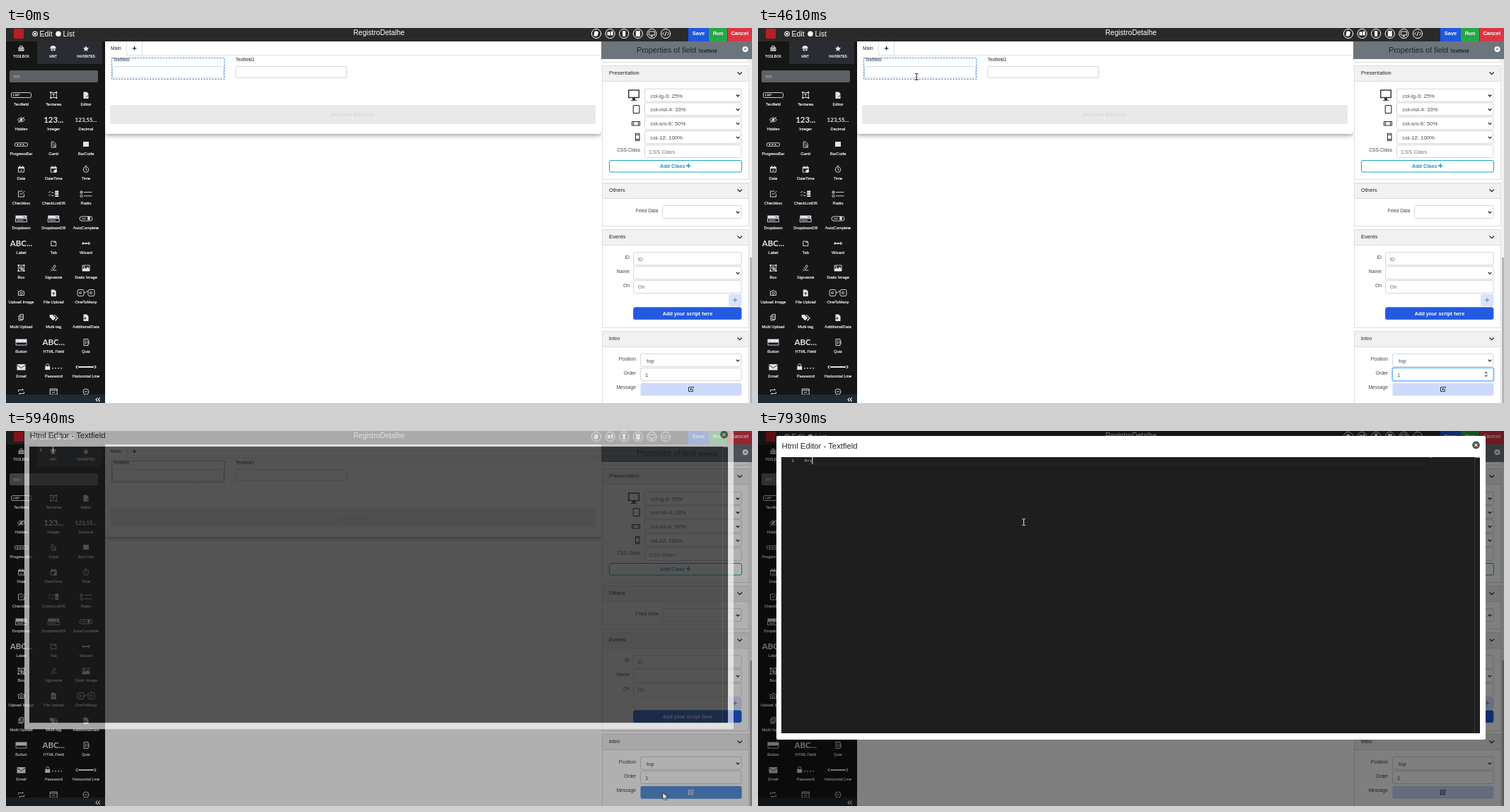
An HTML page that plays this animation: 1054x531 px, repeating every 8 s.

```html
<!DOCTYPE html>
<html lang="en">
<head>
<meta charset="utf-8">
<title>Form builder</title>
<style>
html, body { margin: 0; width: 100%; height: 100%; overflow: hidden; background: #fff; }
svg { display: block; width: 100%; height: 100%; font-family: "Liberation Sans", Arial, sans-serif; }
</style>
</head>
<body>
<svg id="stage" viewBox="0 0 1054 531"></svg>
<script>
const INK = '#212529', SIDE = '#161616', PALE = '#dfe5ee', LINE = '#d0d5da';

// Drawing helpers; text is placed by its vertical centre.
const rect = (x, y, w, h, fill, more = '') =>
  `<rect x="${x}" y="${y}" width="${w}" height="${h}" fill="${fill}" ${more}/>`;
const text = (x, y, s, size, fill = INK, more = '') =>
  `<text x="${x}" y="${y + size * .36}" font-size="${size}" fill="${fill}" ${more}>${s}</text>`;
const line = (d, color, width = 1, more = '') =>
  `<path d="${d}" fill="none" stroke="${color}" stroke-width="${width}" ${more}/>`;
const solid = (d, color) => `<path d="${d}" fill="${color}"/>`;
const dot = (x, y, r) => `M${x - r} ${y}a${r} ${r} 0 1 0 ${2 * r} 0a${r} ${r} 0 1 0 ${-2 * r} 0`;
const group = (x, y, body, more = '') => `<g transform="translate(${x} ${y})" ${more}>${body}</g>`;
const END = 'text-anchor="end"', MID = 'text-anchor="middle"', BOLD = 'font-weight="bold"';

// Icon parts: "#" filled, "!" dark line, "=" lettering, otherwise a line.
const icon = (x, y, parts, color = PALE) => group(x, y, parts.split('|').map(p => {
  const rest = p.slice(1);
  if (p[0] === '#') return solid(rest, color);
  if (p[0] === '!') return line(rest, SIDE, .9);
  if (p[0] === '=') {
    return text(0, 0, rest, rest.length > 6 ? 8 : 11.5, color, `${MID} ${BOLD} font-family="Lato, sans-serif"`);
  }
  return line(p, color, .9);
}).join(''));

const calendar = 'M-4-3h8v7h-8zM-2-5v2M2-5v2|#M-4-3h8v2h-8z|';
const dropdown = '#M-8-4.5h16v4h-16z|M-8 0h16v4.5h-16zM-6 2.3h9|!M3-3.2l1.5 1.5 1.5-1.5';
const file = '#M-3.5-4.5h4.5l2.5 2.5v7h-7z|';
const tools = [
  ['Textfield', 'M-12-3.5h24q2 0 2 2v3q0 2-2 2h-24q-2 0-2-2v-3q0-2 2-2M-11-1.5v3M-9-1h7M-9 .7h5'],
  ['Textarea', 'M-4-3.5h8v7h-8zM-2-1.5h4M0-1.5v4|#M-5-5h2v2h-2zM3-5h2v2h-2zM-5 3h2v2h-2zM3 3h2v2h-2z'],
  ['Editor', file + '!M0 3.5l4-4'],
  ['Hidden', 'M-5 0q5-6 10 0q-5 6-10 0M-4.5 4l9-8|#' + dot(0, 0, 1.8)],
  ['Integer', '=123...'],
  ['Decimal', '=123,55...'],
  ['ProgressBar', 'M-8-2.3h16q1 0 1 1v2.6q0 1-1 1h-16q-1 0-1-1v-2.6q0-1 1-1|#' + dot(-5, 0, 1.1) + dot(-1, 0, 1.1) + dot(3, 0, 1.1)],
  ['Gantt', 'M-3-4h3l3 3v5h-6zM-2-1h2M-1 1h3M0 3h3'],
  ['BarCode', '#M-4-4h8v7h-8z'],
  ['Date', calendar + 'M-1.5 1.3l1.2 1.2 2-2.3'],
  ['DateTime', calendar + '#' + dot(2.5, 2.5, 2.3)],
  ['Time', dot(0, .5, 3.8) + 'M0-1.5v2l1.8 1M-1.5-4.8h3'],
  ['Checkbox', 'M4 0v4h-8v-8h6M-2-1l2 2 5-5'],
  ['CheckListDB', 'M-7-3l1 1 2-2M-7 1.5l1 1 2-2M-3-2h3M-3 2.5h3|#M2-4.5h5v2.4h-5zM2-1.4h5v2.4h-5zM2 1.7h5v2.4h-5z'],
  ['Radio', 'M-3-2.5h11.5M-3 2.8h11.5|' + dot(-6.5, -2.5, 1.7) + dot(-6.5, 2.8, 1.7) + '|#' + dot(-6.5, -2.5, .8)],
  ['Dropdown', dropdown],
  ['DropdownDB', dropdown],
  ['AutoComplete', 'M-6-3h12q3 0 3 3t-3 3h-12q-3 0-3-3t3-3M-6 0h6|#' + dot(4, 0, 2) + 'M2-3h4v1h-4z'],
  ['Label', '=ABC...'],
  ['Tab', 'M-3.5 3.5v-6.5h3l1 1.5h3v5zM0-3h3v1.5'],
  ['Wizard', 'M-5 0h10|#' + dot(-4, 0, 1.6) + dot(0, 0, 1.3) + '|' + dot(4, 0, 1.4)],
  ['Box', 'M-4-4h8v8h-8zM-2-2h3v3h-3zM0 0h2.5v2.5h-2.5z|#M-5-5h2v2h-2zM3-5h2v2h-2zM-5 3h2v2h-2zM3 3h2v2h-2z'],
  ['Signature', 'M-4 3h3l4-6-1.5-1.5-4 5.5M0 3h4'],
  ['Static Image', 'M-5-4h10v8h-10z|#M-5 4v-2l3-3 2 2 2-3 3 3v3z' + dot(-2.5, -2, 1)],
  ['Upload Image', 'M-4-2h2l1-1.5h2l1 1.5h2v5.5h-8z' + dot(0, .7, 1.6)],
  ['File Upload', file + '!M0 3.5v-4M-1.7 1l1.7-1.7 1.7 1.7'],
  ['OneToMany', 'M-10-4.5h5q2 0 2 2v5q0 2-2 2h-5q-2 0-2-2v-5q0-2 2-2M-10-1h4M-10 1h4M-3 0h2l2-2h2M5-4.5h5q2 0 2 2v5q0 2-2 2h-5q-2 0-2-2v-5q0-2 2-2M5-1h4M5 1h4'],
  ['Multi Upload', 'M-1.5-4.5h4.5v7h-4.5zM-1.5-2.5h-2v6.5h5v-1.5M0-2h2M0 0h2'],
  ['Multi-tag', '#M-5.5-4h4l4.5 4.5-3.7 3.7-4.8-4.8zM0-4l5 4.5-3.5 3.7 2 .3 3-4-5-4.5z'],
  ['AdditionalData', file + '!M-4 1h4M-1.5-.7l1.7 1.7-1.7 1.7'],
  ['Button', '#M-8-4.5h16v5h-16z|M-7.5 1v3h15v-3'],
  ['HTML Field', '=ABC...'],
  ['Quiz', 'M-3-4.5h6v9h-6zM-1.5-2h2M-1.5 0h3M-1.5 2h2M3-2h1v5'],
  ['Email', '#M-6-4h12v8.5h-12z|!M-6-3l6 4.5 6-4.5'],
  ['Password', '#M-12-1h7v5h-7zM-2 1h1.6v1.6h-1.6zM2 1h1.6v1.6h-1.6zM6 1h1.6v1.6h-1.6zM10 1h1.6v1.6h-1.6z|M-10.5-1v-1.5a2 2 0 0 1 4 0v1.5'],
  ['Horizontal Line', '#M-13-1h26v2h-26z' + dot(-12.5, 0, 2) + dot(12.5, 0, 2)],
  ['', 'M-4 0v-2.5h7l-1.5-1.5M4 0v2.5h-7l1.5 1.5'],
  ['', 'M-5-4h10v8h-10zM-5-2h10M-2 1h4'],
  ['', dot(0, 0, 4) + 'M-2 0h4'],
];

function topBar() {
  const marks = [
    '#M-2.5-3.5h4l1.5 1.5-1.5 5.5h-5z', '#M-4-2.5h4v5h-4zM1-3.5h3v6h-3z', '#M-2-4h4v8h-4z',
    '#M-3-4h6v8h-6z', 'M-4-3h8v5h-8zM0 2v2M-2 4h4', 'M-2-2.5l-2.5 2.5 2.5 2.5M2-2.5l2.5 2.5-2.5 2.5M1-3l-2 6',
  ];
  const button = (x, w, label, color) => rect(x, 0, w, 19, color) + text(x + w / 2, 7.5, label, 7.5, '#fff', `${MID} ${BOLD}`);
  return rect(0, 0, 1054, 19, '#2a2a2b') + rect(11, 1, 14, 14, '#b91d25')
    + solid(dot(41, 8.3, 3.8) + dot(74, 8.3, 3.8), '#fff') + line(dot(41, 8.3, 2.2), '#333', 1.1)
    + text(47.5, 8.3, 'Edit', 10.5, '#fff') + text(80.5, 8.3, 'List', 10.5, '#fff')
    + text(527, 6.8, 'RegistroDetalhe', 10.1, '#fff', MID)
    + marks.map((m, i) => icon(834 + 19.6 * i, 8, m, '#fff') + line(dot(834 + 19.6 * i, 8, 6.6), '#fff', 1)).join('')
    + button(964, 29, 'Save', '#2258df') + button(993, 26, 'Run', '#28a745') + button(1019.5, 34.5, 'Cancel', '#dc3545');
}

function sidebar() {
  const tab = (x, label, mark) => icon(x, 29, mark) + text(x, 40, label, 4.6, '#fff', `${MID} ${BOLD}`);
  return rect(0, 19, 140, 512, SIDE) + rect(44, 19, 92, 32, '#292c30')
    + tab(21.5, 'TOOLBOX', '#M-4-1.5h8v5h-8z|M-1.7-1.5v-2h3.4v2|!M-4 1h8')
    + tab(66.5, 'HINT', '#M-4-.5q0-3.5 4-3.5t4 3.5v1h-8zM-3 1.3h2.5v2h-2.5zM.5 1.3h2.5v2h-2.5z')
    + tab(113, 'FAVORITES', '#M0-4l1.2 2.7 3 .3-2.2 2 .6 3-2.6-1.5-2.6 1.5.6-3-2.2-2 3-.3z')
    + rect(5, 60, 125, 17, '#5d6064', 'rx="2"') + text(10.5, 68.3, 'em', 6.8, '#b0b4b9')
    + tools.map(([label, parts], i) => {
      const x = 21.5 + 45.75 * (i % 3), y = 95 + 35 * Math.floor(i / 3);
      return icon(x, y, parts) + text(x, y + 13.3, label, 5.75, '#fff', `${MID} stroke="#fff" stroke-width=".15"`);
    }).join('')
    + rect(0, 519, 140, 12, '#202a32') + line('M129.5 523.5l-2.5 2.7 2.5 2.7M132.8 523.5l-2.5 2.7 2.5 2.7', '#fff', 1.1);
}

const field = (x, y, w, h = 18) => rect(x, y, w, h, '#fff', `stroke="${LINE}" rx="2"`);

function canvasArea() {
  return rect(140, 19, 701, 131, '#fff', 'rx="4" style="filter:drop-shadow(0 2px 3px #0006)"')
    + rect(140, 19, 701, 20, '#fff') + line('M170.5 19v19M192.5 19v19M170.5 38.5h670', '#dee2e6')
    + text(148, 29, 'Main', 6.8) + line('M178.7 28.8h5.6M181.5 26v5.6', INK, 1.2)
    + field(150.5, 54.5, 157, 16) + text(151, 44.5, 'Textfield', 6.3)
    + field(324.5, 54.5, 157, 16) + text(324.5, 44.5, 'Textfield1', 6.3)
    + rect(149.5, 42.5, 159, 30, 'none', 'stroke="#4d8fd6" stroke-dasharray="2.5 1.5"')
    + rect(147, 109, 686, 27, '#e9e9e9') + text(490, 122.5, 'Drop new field here!', 6.9, '#cfd1d3', MID);
}

function properties() {
  const card = (y, h, title) => rect(842.5, y + .5, 207, h, '#fff', 'stroke="#dcdcdc"')
    + rect(843, y + 1, 206, 21.5, '#f1f1f1') + line(`M843 ${y + 22.5}h206`, '#dcdcdc')
    + text(852, y + 10.5, title, 7.6) + line(`M1033.5 ${y + 9.5}l3.2 3.2 3.2-3.2`, INK, 1.2);
  const label = (x, y, s) => text(x, y, s, 6.8, '#444', END);
  const input = (x, y, s) => field(x, y, 1039 - x) + text(x + 6, y + 9.3, s, 7.6, '#6c757d');
  const select = (x, y, s = '') => field(x, y, 1039 - x) + text(x + 8, y + 9.5, s, 7.8, '#495057')
    + line(`M1031.7 ${y + 8.3}l2.3 2.3 2.3-2.3`, '#222', 1.3);
  return rect(841, 19, 213, 512, '#fff') + line('M842.5 44v4.5h207V44', '#dcdcdc')
    + rect(841, 19, 213, 25, '#6c757d')
    + text(891, 31.3, 'Properties of field', 10.8) + text(978, 32.5, 'Textfield', 6.6, INK, BOLD)
    + solid(dot(1044.5, 30, 4), '#fff') + line('M1043 28.5l3 3M1046 28.5l-3 3', '#555', 1)
    + card(53, 161, 'Presentation')
    + ['col-lg-3: 25%', 'col-md-4: 33%', 'col-sm-6: 50%', 'col-12: 100%'].map((s, i) => select(902.5, 86.2 + 19.8 * i, s)).join('')
    + line('M879.7 88h14.6v10.5h-14.6z', '#343a40', 1.5) + solid('M885 99h4v3h2v1h-8v-1h2z', '#343a40')
    + rect(886.3, 109.7, 8.6, 11, 'none', 'stroke="#343a40" stroke-width="1.2" rx="1"')
    + line('M884.5 132.5h11v5.5h-11zM886.7 132.5v5.5M893.3 132.5v5.5', '#343a40', 1.1)
    + line('M889.5 149.5h5.5v10h-5.5zM889.5 151.3h5.5M889.5 157.6h5.5', '#343a40', 1.1)
    + label(896, 172.5, 'CSS Class') + input(902.5, 165.5, 'CSS Class')
    + rect(852.5, 187.5, 187, 16.5, '#fff', 'stroke="#17a2b8" rx="2.5"')
    + text(924, 195, 'Add Class', 7.2, '#1797b0', BOLD) + line('M961 195h6.4M964.2 191.8v6.4', '#1797b0', 1.3)
    + card(219, 61, 'Others') + label(921.5, 259, 'Feed Data') + select(927.5, 251.5)
    + card(285, 139, 'Events')
    + label(881, 325, 'ID') + input(886.5, 317.8, 'ID')
    + label(881, 345, 'Name') + select(886.5, 337.6)
    + label(881, 365, 'On') + input(886.5, 357.4, 'On')
    + rect(1021, 377, 18.5, 17, '#d9e2fa', 'rx="2"') + line('M1027 385.3h6M1030 382.3v6', '#6b7a99', 1)
    + rect(886.5, 395.7, 152.5, 17, '#2459e0', 'stroke="#1f86c9" rx="2.5"')
    + text(963, 404, 'Add your script here', 7.2, '#fff', `${MID} ${BOLD}`)
    + card(429, 110, 'Intro')
    + label(890, 468.7, 'Position') + select(896.5, 461.3, 'top').replace('x="904.5"', 'x="905"')
    + label(890, 488.7, 'Order') + field(896.5, 481.5, 142.5)
    + group(0, 0, rect(896.5, 481.5, 142.5, 18, '#fff', 'stroke="#80bdff" rx="2"')
      + rect(895.7, 480.7, 144.1, 19.6, 'none', 'stroke="#007bff" stroke-opacity=".3" stroke-width="1.7" rx="2.5"')
      + solid('M1026.5 489.3l2.3-3 2.3 3zM1026.5 491.5l2.3 3 2.3-3z', '#666'), 'id="focus"')
    + text(903, 490.7, '1', 7.8, '#495057') + rect(907, 486, .9, 9, '#222', 'id="orderCaret"')
    + label(890, 508.7, 'Message') + rect(896.5, 502.8, 143, 18, '#cddafc', 'rx="2.5" id="message"')
    + line('M968.5 508.7h-4v6h6v-3M966.8 512.5l.4-1.7 3.3-3.3 1.3 1.3-3.3 3.3z', INK, .9, 'id="pencil"')
    + rect(1050.5, 44, 3.5, 487, '#f1f1f1') + rect(1051, 325, 3, 206, '#b5b5b5');
}

function modal() {
  return rect(26, 7, 1002, 430, '#fff', 'rx="2"') + text(33.5, 21.3, 'Html Editor - Textfield', 11.3)
    + solid(dot(1014.5, 20, 5.4), '#555') + line('M1012.7 18.2l3.6 3.6M1016.3 18.2l-3.6 3.6', '#fff', 1.2)
    + rect(33, 37, 987, 391, '#1e1e1e') + line('M66 37.5h879M66 47h879', '#2b2b2b', .8)
    + line('M1012.5 37v391', '#383838') + rect(1013, 37, 7, 1, '#9a9a9a')
    + text(47.5, 42, '1', 6, '#c6c6c6', 'font-family="Liberation Mono, monospace"')
    + text(66, 42, '', 5.75, '#d4d4d4', 'font-family="Liberation Mono, monospace" id="code"')
    + rect(949, 37, 0, 1, '#777', 'id="minimap"') + rect(66, 37, 1, 10, '#eee', 'id="codeCaret"');
}

const cursors = {
  arrow: '<path d="M0 0v9.5l2.2-2 1.5 3.4 1.6-.7-1.5-3.3h3z" fill="#fff" stroke="#111" stroke-width=".7"/>',
  hand: '<path d="M-1 6V1a1 1 0 0 1 2 0V4l3.5.8q1 .3 1 1.5V8.500l-1 3h-4.500l-3-4q.6-1.300 2-.5z" fill="#fff" stroke="#111" stroke-width=".8"/>',
  beam: line('M-2.3-4.700q2.300 0 2.300 1.200v7q0 1.200-2.300 1.200M2.300-4.700q-2.300 0-2.300 1.200M2.300 4.700q-2.300 0-2.300-1.200', 'currentColor', 1),
};

document.getElementById('stage').innerHTML = rect(0, 0, 1054, 531, '#fff') + canvasArea() + properties() + topBar() + sidebar()
  + rect(0, 0, 1054, 531, '#000', 'id="backdrop"') + group(0, 0, modal(), 'id="modal"') + '<g id="cursor"></g>';

const el = Object.fromEntries([...document.querySelectorAll('[id]')].map(e => [e.id, e]));
const set = (id, attrs) => { for (const k in attrs) el[id].setAttribute(k, attrs[k]); };
const clamp = v => Math.max(0, Math.min(1, v));

// Pointer path: time, x, y
const path = [
  [70, 497, 525], [350, 700, 362], [650, 985, 420], [870, 996, 480], [1200, 912, 491], [1620, 912, 491],
  [1820, 908, 489], [1960, 908, 490], [2230, 910, 494], [2570, 912, 491], [2900, 912, 491], [3100, 902, 490],
  [3330, 910, 491], [3530, 910, 491], [4270, 426, 204], [4600, 224, 69], [4820, 222, 67], [5100, 290, 51],
  [5520, 928, 512], [6070, 928, 512], [6410, 446, 160], [6550, 375.5, 129],
];

function pointerAt(t) {
  const i = path.findIndex(p => p[0] > t);
  if (i < 0) return path[path.length - 1].slice(1);
  if (i === 0) return path[0].slice(1);
  const [t0, x0, y0] = path[i - 1], [t1, x1, y1] = path[i];
  const u = (t - t0) / (t1 - t0), k = u * u * (3 - 2 * u);
  return [x0 + (x1 - x0) * k, y0 + (y1 - y0) * k];
}

function pointerShape(x, y, t) {
  const inside = (l, top, r, b) => x > l && x < r && y > top && y < b;
  if (t > 5870) return t > 6070 && inside(33, 37, 1020, 428) ? 'beam' : 'arrow';
  if (inside(897, 502, 1039, 521)) return 'hand';
  return inside(150, 42, 308, 73) || inside(897, 481, 1039, 500) ? 'beam' : 'arrow';
}

function draw(t) {
  const step = Math.floor(t * .015 + .06) / .015;

  const focus = t < 5730 ? clamp((step - 1400) / 150) : 0;
  set('focus', { opacity: focus });
  set('orderCaret', { opacity: focus && (t - 1470 + 1060) % 1060 < 530 ? 1 : 0 });

  const hover = clamp((step - 5640) / 150) * clamp(1 - (step - 5870) / 150);
  const mix = (a, b) => Math.round(a + (b - a) * hover);
  set('message', { fill: `rgb(${mix(205, 6)},${mix(218, 96)},${mix(252, 204)})` });
  set('pencil', { stroke: hover > .5 ? '#fff' : INK });

  const fade = clamp((step - 5840) / 150), slide = clamp((step - 5840) / 300);
  set('backdrop', { opacity: fade / 2 });
  set('modal', { opacity: fade, transform: `translate(0 ${-28 * (1 - slide) ** 1.7})` });

  const typed = 'Pri'.slice(0, t < 7530 ? 0 : 1 + Math.floor((t - 7530) / 200));
  el.code.textContent = typed;
  set('minimap', { width: typed.length });
  const caretOff = (t >= 6400 && t < 6880) || (t >= 7410 && t < 7530);
  set('codeCaret', { x: 66 + 3.45 * typed.length, opacity: caretOff ? 0 : 1 });

  const [x, y] = pointerAt(step), shape = pointerShape(x, y, step);
  el.cursor.innerHTML = t < 70 ? '' : cursors[shape];
  set('cursor', { transform: `translate(${x} ${y})`, color: t > 6070 ? '#eee' : '#111' });
}

const start = performance.now();
function frame() {
  draw((performance.now() - start) % 8000);
  requestAnimationFrame(frame);
}
frame();
</script>
</body>
</html>
```
